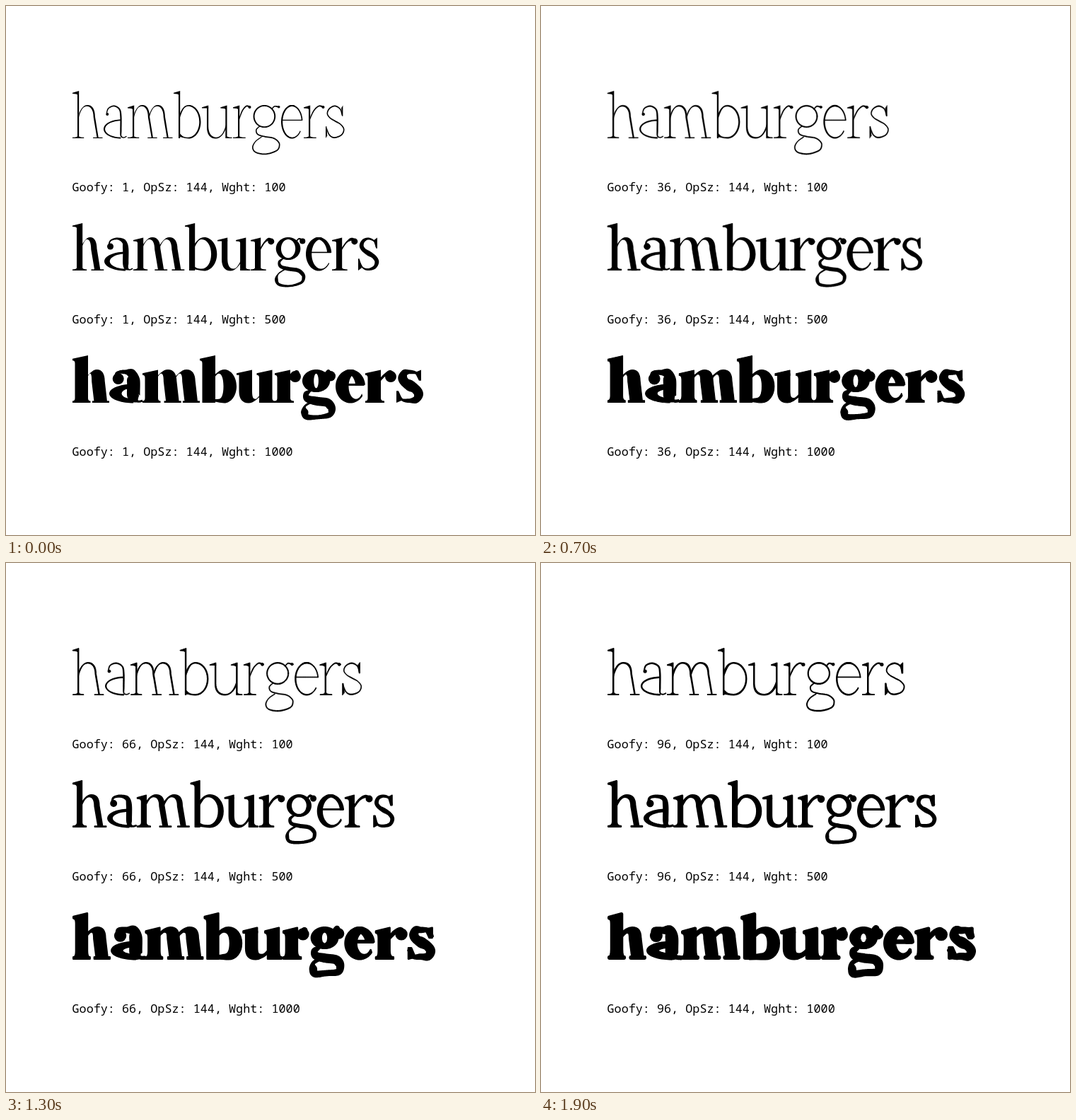
An HTML page that plays this animation: 748x748 px, repeating every 2 s.

```html
<!DOCTYPE html>
<html lang="en">
<head>
<meta charset="utf-8">
<title>Variable type specimen</title>
<style>
  html, body { margin: 0; width: 100%; height: 100%; overflow: hidden; background: #fff; }
  svg { display: block; width: 100vw; height: 100vh; }
  text { font: 500 16.8px "Noto Sans Mono", monospace; white-space: pre; }
  g { stroke: #000; stroke-linejoin: round; stroke-linecap: round; }
</style>
</head>
<body>
<svg id="stage" viewBox="0 0 748 748"></svg>
<script>
const WORD = 'hamburgers';
const X = 46.5, ASC = 67;        // x-height and ascender
const STEP = 100, STEPS = 20;

// Each pair runs from the sharpest to the softest drawing.
// S stem, T hairline, V serif, F serif reach, B ball radius
const rows = [
  { y: 187, weight: 100, gap: 1.5, lean: 5,
    S: [2.2, 2.5], T: [1.3, 1.9], V: [1.2, 1.9], F: [7, 7], B: [2, 2.6],
    x: [[94, 138, 172, 237, 277, 321, 348, 389, 421, 452, 480],
        [94, 141, 178, 250, 293, 343, 375, 417, 454, 486, 516]] },
  { y: 374, weight: 500, gap: 0.7, lean: 5,
    S: [8.2, 8.2], T: [1.6, 3.3], V: [1.6, 3.3], F: [6, 6], B: [4.5, 5.2],
    x: [[94, 139, 180, 253, 299, 346, 380, 424, 461, 498, 528],
        [94, 145, 187, 264, 313, 363, 402, 447, 487, 529, 560]] },
  { y: 561, weight: 1000, gap: 0, lean: 3.5,
    S: [18.5, 18.5], T: [3, 6.5], V: [2.6, 6], F: [3.5, 3.8], B: [8, 9],
    x: [[94, 146, 193, 274, 326, 380, 417, 466, 508, 552, 590],
        [94, 149, 198, 282, 338, 396, 434, 484, 528, 575, 615]] },
];

const mix = (a, b, k) => a + (b - a) * k;
const fix = n => n.toFixed(2);
let p, out;                      // current pen and collected shapes

const path = (d, turn = '') => out.push(`<path d="${d}"${turn}/>`);
const polygon = pts => path('M' + pts.map(q => fix(q[0]) + ' ' + fix(q[1])).join('L') + 'Z');
const ball = (x, y, r = p.B) =>
  out.push(`<circle cx="${fix(x)}" cy="${fix(y)}" r="${fix(r - p.h)}"/>`);

// Smooth stroke through [x, y, width] nodes.
function pen(nodes) {
  const at = i => nodes[Math.max(0, Math.min(nodes.length - 1, i))];
  const pts = [];
  for (let i = 0; i < nodes.length - 1; i++) {
    const [a, b, c, d] = [at(i - 1), at(i), at(i + 1), at(i + 2)];
    for (let j = 0; j < 12 || (i === nodes.length - 2 && j === 12); j++) {
      const t = j / 12;
      const curve = n => b[n] + t / 2 * (c[n] - a[n] + t * (2 * a[n] - 5 * b[n] + 4 * c[n] - d[n]
        + t * (3 * (b[n] - c[n]) + d[n] - a[n])));
      pts.push([curve(0), curve(1), mix(b[2], c[2], t * t * (3 - 2 * t))]);
    }
  }
  const left = [], right = [];
  pts.forEach(([x, y, w], i) => {
    const a = pts[Math.max(0, i - 1)], b = pts[Math.min(pts.length - 1, i + 1)];
    const dx = b[0] - a[0], dy = b[1] - a[1], len = Math.hypot(dx, dy) || 1;
    const half = Math.max(0.1, w - 2 * p.h) / 2;
    left.push([x - dy / len * half, y + dx / len * half]);
    right.unshift([x + dy / len * half, y - dx / len * half]);
  });
  polygon(left.concat(right));
}

// Band between two ellipses; sl, sr, sv are its left, right and vertical thickness.
function ring(cx, cy, rx, ry, sl, sr, sv, from = 0, to = 360) {
  const { h } = p, outer = [], inner = [];
  for (let a = from; a <= to; a += 5) {
    const c = Math.cos(a * Math.PI / 180), s = Math.sin(a * Math.PI / 180);
    outer.push([cx + (rx - h) * c, cy + (ry - h) * s]);
    inner.unshift([cx + (sl - sr) / 2 + (rx - (sl + sr) / 2 + h) * c, cy + (ry - sv + h) * s]);
  }
  polygon(outer.concat(inner));
}

// Upright stem with a sloped flag on top and foot serifs.
function post(L, top, footL, footR) {
  const { S, V, F, h, slope } = p;
  const l = L + h, r = L + S - h, tip = L - F + h, under = top + slope + V - h;
  const foot = -V + h, bend = -V * 2.5;
  path(`M${tip} ${top + slope + h}L${r} ${top + h}V${bend}Q${r} ${foot} ${r + footR} ${foot}V${-h}` +
    `H${l - footL}V${foot}Q${l} ${foot} ${l} ${bend}V${under + V * 1.5}Q${l} ${under} ${tip} ${under}Z`);
}

function slab(a, b) {
  const { V, h } = p;
  path(`M${a + h} ${-h}H${b - h}V${-V + h}H${a + h}Z`);
}

// Shoulder that leaves a stem at xs and comes down to a leg whose right edge is R.
function arch(xs, R, lean, base = 0, turn = '') {
  const { S, h, tt } = p;
  const Q = R - lean - h, d = Q - xs, apex = xs + 0.53 * d, top = -X - 0.5 + h;
  const q = R - lean - S + h, di = q - xs, dip = xs + 0.53 * di, under = -X - 0.5 + tt - h;
  const root = xs - S / 2;
  path(`M${root} ${-0.66 * X}C${xs + 0.04 * d} ${-0.84 * X} ${xs + 0.24 * d} ${top} ${apex} ${top}` +
    `C${apex + 0.3 * d} ${top} ${Q} ${-0.88 * X} ${Q} ${-0.66 * X}L${R - h} ${base - h}H${R - S + h}` +
    `L${q} ${-0.64 * X}C${q} ${-0.84 * X} ${dip + 0.3 * di} ${under} ${dip} ${under}` +
    `C${dip - 0.3 * di} ${under} ${xs + 0.06 * di} ${-0.78 * X} ${root} ${-0.56 * X}Z`, turn);
}

// Right leg foot, reaching equally to both sides.
const legFoot = R => slab(R - p.S - 0.8 * p.F, R + 0.8 * p.F);

function bowl(xs, x1) {
  const { S, h, tt } = p;
  const r = x1 - h, d = r - xs, cx = xs + 0.42 * d, kx = 0.56 * (r - cx);
  const q = x1 - S + h, di = q - xs, ix = xs + 0.42 * di, ki = 0.56 * (q - ix);
  const top = -X - 0.5 + h, low = 0.5 - h, inTop = -X - 0.5 + tt - h, inLow = 0.5 - tt + h;
  const root = xs - S / 2, mid = -X / 2;
  path(`M${root} ${-0.7 * X}C${xs + 0.08 * d} ${-0.9 * X} ${xs + 0.2 * d} ${top} ${cx} ${top}` +
    `C${cx + kx} ${top} ${r} ${-0.78 * X} ${r} ${mid}C${r} ${-0.22 * X} ${cx + kx} ${low} ${cx} ${low}` +
    `C${xs + 0.2 * d} ${low} ${xs} ${-0.05 * X} ${root} ${-0.04 * X}L${root} ${-0.16 * X}` +
    `C${xs + 0.1 * di} ${-0.08 * X} ${ix - 0.3 * di} ${inLow} ${ix} ${inLow}` +
    `C${ix + ki} ${inLow} ${q} ${-0.24 * X} ${q} ${mid}C${q} ${-0.76 * X} ${ix + ki} ${inTop} ${ix} ${inTop}` +
    `C${ix - 0.25 * di} ${inTop} ${xs + 0.1 * di} ${-0.8 * X} ${root} ${-0.58 * X}Z`);
}

// Every glyph is drawn between the ink edges x0 and x1.
const glyphs = {
  h(x0, x1) {
    const { S, F, lean } = p, L = x0 + F, R = x1 - 0.8 * F;
    post(L, -ASC, F, F);
    arch(L + S, R, lean);
    legFoot(R);
  },
  a(x0, x1) {
    const { S, T, F, B, tt } = p, w = x1 - x0, stem = x1 - F - S / 2, reach = stem - x0;
    ball(x0 + 0.1 * w + B, -0.73 * X);
    pen([[x0 + 0.1 * w + 0.5 * B, -0.76 * X, T], [x0 + 0.2 * w + 0.2 * B, -0.91 * X, T * 1.2],
      [x0 + 0.46 * w, -X + tt / 2, tt], [stem - 0.06 * w, -0.88 * X, mix(tt, S, 0.6)],
      [stem, -0.66 * X, S], [stem, -0.25 * X, S], [stem + 0.08 * S, -0.06 * X - 0.2 * S, 0.8 * S],
      [(stem + x1) / 2, -T / 2 - 0.3, T], [x1, -0.06 * X, T]]);
    ring(stem, -0.28 * X, reach, 0.29 * X, 0.95 * S, 0.95 * S, tt, 90, 270);
  },
  m(x0, x1) {
    const { S, F, lean } = p, L = x0 + F, R = x1 - 0.8 * F, M = (R + L + S + lean) / 2;
    post(L, -X, F, F);
    arch(L + S, M, lean);
    legFoot(M);
    arch(M - lean, R, lean);
    legFoot(R);
  },
  b(x0, x1) {
    const L = x0 + p.F;
    post(L, -ASC, 0, 0);
    bowl(L + p.S, x1);
  },
  u(x0, x1) {
    const { S, V, F, h, slope } = p, L = x0 + F, right = x1 - F - S, c = x0 + x1;
    arch(c - right, c - L, 0, -slope, ` transform="rotate(180 ${c / 2} ${-X / 2})"`);
    path(`M${x0 + h} ${-X + slope + h}L${L + S - h} ${-X + h}V${-X + slope + V - h}H${x0 + h}Z`);
    post(right, -X, 0, F);
  },
  r(x0, x1) {
    const { S, T, F, B } = p, L = x0 + F, xs = L + S;
    post(L, -X, F, F + 1.5);
    pen([[xs - 0.3 * S, -0.58 * X, T], [mix(xs, x1, 0.25), -0.84 * X, T * 1.2],
      [mix(xs, x1, 0.6), -X + 0.5 * B, B * 0.9], [x1 - B, -X + 1.2 * B, B * 1.3]]);
    ball(x1 - B, -X + 1.2 * B);
  },
  g(x0, x1) {
    const { S, T, B, tt } = p, w = x1 - x0, px = f => x0 + f * w;
    const bar = 0.62 * S + 0.3 * T, flank = 0.5 * S + 0.4 * T;
    ring(px(0.44), -0.665 * X, 0.4 * w, 0.345 * X, 0.88 * S, 0.88 * S, tt);
    pen([[px(0.7), -0.88 * X, T], [px(0.8), -0.97 * X, T * 1.2], [x1 - B, -X + 1.1 * B, B]]);
    ball(x1 - 0.9 * B, -X + 1.1 * B, 0.9 * B);
    pen([[px(0.28), -0.37 * X, T], [px(0.15), -0.26 * X, mix(T, bar, 0.5)],
      [px(0.2), -0.12 * X, mix(T, bar, 0.8)], [px(0.45), -0.05 * X, bar], [px(0.74), -0.01 * X, bar],
      [px(0.92) - 0.2 * S, 0.08 * X, bar], [x1 - flank / 2, 0.2 * X, flank],
      [px(0.9) - 0.2 * S, 0.37 * X, mix(tt, flank, 0.4)], [px(0.5), 0.5 * X - tt / 2, tt],
      [px(0.13) + 0.1 * S, 0.43 * X, mix(tt, flank, 0.5)], [x0 + flank / 2, 0.28 * X, flank],
      [px(0.12), 0.1 * X, T], [px(0.34), -0.04 * X, T]]);
  },
  e(x0, x1) {
    const { S, T, tt } = p, cx = (x0 + x1) / 2, rx = (x1 - x0) / 2, ry = X / 2 + 0.5;
    ring(cx, -X / 2, rx, ry, S, T, tt, 35, 285);
    ring(cx, -X / 2, rx, ry, T, Math.max(T, 0.75 * S), tt, 250, 355);
    pen([[x0 + S / 2, -0.55 * X, T], [x1 - T / 2, -0.55 * X, T]]);
  },
  s(x0, x1) {
    const { S, T, B, tt, h } = p, w = x1 - x0, px = f => x0 + f * w;
    const spur = px(0.92) - h, heel = x0 + h, side = Math.max(T, 0.72 * S);
    const l = px(0.06) + side / 2, r = x1 - side / 2, mid = px(0.49), turn = mix(tt, side, 0.6);
    pen([[px(0.88), -0.7 * X, T], [px(0.77), -0.89 * X, T * 1.2], [mid, -X + tt / 2, tt],
      [mix(l, mid, 0.27), -0.9 * X, turn], [l, -0.75 * X, side], [mix(l, mid, 0.35), -0.62 * X, side],
      [px(0.51), -0.52 * X, 0.85 * S], [mix(r, mid, 0.35), -0.42 * X, side], [r, -0.27 * X, side],
      [mix(r, mid, 0.27), -0.1 * X, turn], [px(0.46), -tt / 2, tt],
      [px(0.2), -0.1 * X, T * 1.2], [px(0.05), -0.3 * X, T]]);
    polygon([[spur, -X + h], [spur, -0.67 * X], [spur - T + h, -0.67 * X], [spur - 1.1 * B, -0.92 * X]]);
    polygon([[heel, -h], [heel, -0.36 * X], [heel + T - h, -0.36 * X], [heel + 1.1 * B, -0.08 * X]]);
  },
};

const stage = document.getElementById('stage');
stage.innerHTML = rows.map(({ y }) =>
  `<g role="img" aria-label="${WORD}" transform="translate(0 ${y})"></g><text x="93.5" y="${y + 75}"></text>`).join('');
const words = stage.querySelectorAll('g'), captions = stage.querySelectorAll('text');

function draw(goofy) {
  const k = (goofy - 1) / 95;
  rows.forEach((row, i) => {
    const at = key => mix(...row[key], k);
    p = { S: at('S'), T: at('T'), V: at('V'), F: at('F'), B: at('B'), lean: row.lean };
    p.h = 0.4 * p.V * k;                    // corner rounding
    p.tt = 1.2 * p.T + 0.12 * p.S;          // thickness at the top of curves
    p.slope = 2.5 + 0.12 * p.S;
    out = [];
    const edge = n => mix(row.x[0][n], row.x[1][n], k);
    [...WORD].forEach((c, n) => glyphs[c](edge(n), edge(n + 1) - row.gap));
    words[i].setAttribute('stroke-width', 2 * p.h);
    words[i].innerHTML = out.join('');
    captions[i].textContent = `Goofy: ${goofy}, OpSz: 144, Wght: ${row.weight}`;
  });
}

let shown = -1;
function tick() {
  const step = Math.floor(performance.now() / STEP) % STEPS;
  if (step !== shown) draw(1 + 5 * (shown = step));
  requestAnimationFrame(tick);
}
tick();
</script>
</body>
</html>
```
